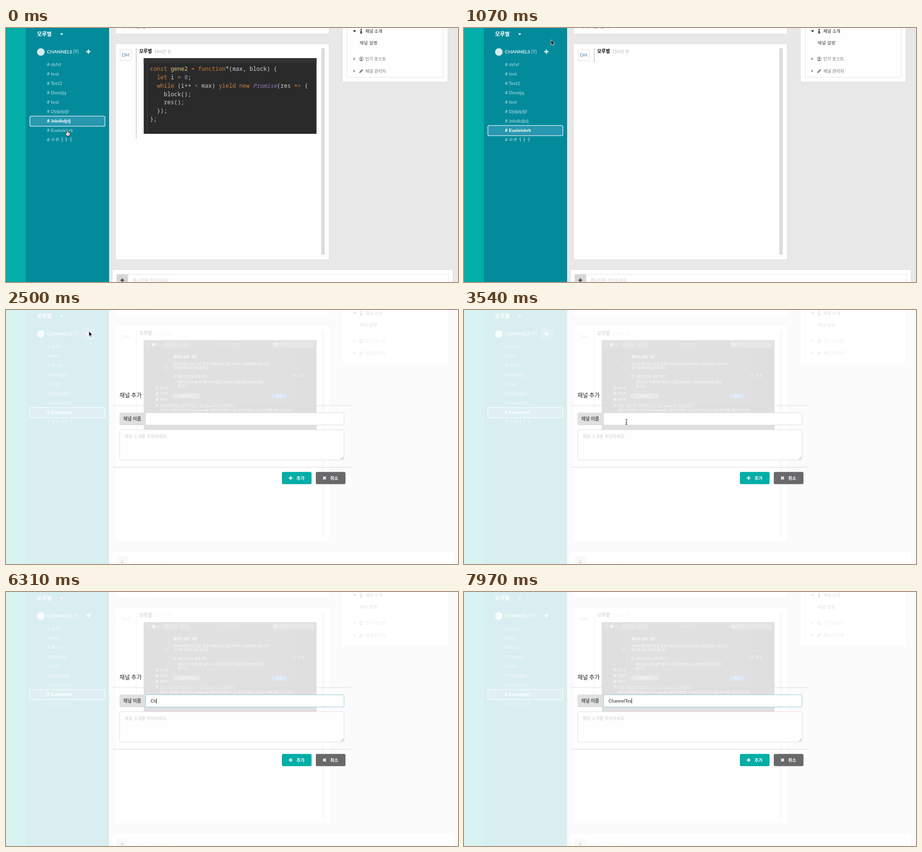
Write an HTML page that moves like this. It is 960 by 540 pixels and loops after 8 s.

```html
<!DOCTYPE html>
<html lang="ko">
<head>
<meta charset="utf-8">
<title>채널 추가</title>
<style>
html, body { margin: 0; width: 100%; height: 100%; overflow: hidden; background: #e9e8e9; }
svg { display: block; width: 960px; height: 540px; }
text { font-family: Lato, "Noto Sans CJK KR", "Noto Sans CJK", sans-serif; white-space: pre; }
.code text { font: 500 12.15px "Noto Sans Mono", "DejaVu Sans Mono", monospace; }
</style>
</head>
<body>
<svg id="stage" viewBox="0 0 960 540"></svg>
<script>
const LOOP = 8000;
const stage = document.getElementById('stage');

const rect = (x, y, w, h, fill, more = '') =>
  `<rect x="${x}" y="${y}" width="${w}" height="${h}" fill="${fill}" ${more}/>`;
const path = (d, fill, more = '') => `<path d="${d}" fill="${fill}" ${more}/>`;
const circle = (x, y, r, fill, more = '') => `<circle cx="${x}" cy="${y}" r="${r}" fill="${fill}" ${more}/>`;
const text = (x, y, size, fill, str, more = '') =>
  `<text x="${x}" y="${y}" font-size="${size}" fill="${fill}" ${more}>${str}</text>`;
const line = (x1, y1, x2, y2, color, more = '') =>
  path(`M${x1} ${y1}L${x2} ${y2}`, 'none', `stroke="${color}" ${more}`);
const plus = (x, y, r, color, turn = 0) =>
  path(`M${x - r} ${y}h${2 * r}M${x} ${y - r}v${2 * r}`, 'none',
    `stroke="${color}" stroke-width="2.6" transform="rotate(${turn} ${x} ${y})"`);
const group = (id, body, more = '') => `<g id="${id}" ${more}>${body}</g>`;

const PAPER = '#fefefe', PAGE = '#e9e8e9', EDGE = '#dededf', TEAL = '#02aea7', SIDE = '#038b9c';
const ITEM = '#8cc9d2', BOLD = 'font-weight="700"', MEDIUM = 'font-weight="500"', MID = 'text-anchor="middle"';
const card = (x, y, w, h) => rect(x, y, w, h, PAPER, `rx="3" stroke="${EDGE}"`);

const USER = '모루별';
const CHANNELS = ['dsfsf', 'test', 'Test2', 'Dmstjq', 'test', 'Djdjdjdjf', 'Jekdkdjdj', 'Eueieiekrk', 'ㅇㄹㅓㅏㅓ'];

function sidebar() {
  return rect(0, 0, 42, 540, TEAL) + rect(42, 0, 177, 540, SIDE) +
    text(66, 17, 11.2, '#fff', USER, BOLD) + path('M115 11.5h6.6l-3.3 4z', '#fff') +
    circle(74, 51, 8, '#d4ebee') +
    text(87, 54, 10.1, '#d9eef1', 'CHANNELS', BOLD) + text(142.7, 54, 10.5, '#b5dbe1', '(9)') +
    group('plusGlow', rect(162, 37.5, 27, 26, '#2b9bae', 'rx="3"')) + plus(175, 50.3, 4.5, '#e4f3f5') +
    group('selected', rect(50.7, 187.3, 159.3, 21.6, '#2897b0', 'rx="3" stroke="#e4f2f5" stroke-width="1.3"')) +
    CHANNELS.map((name, i) =>
      text(87, 80.5 + 20 * i, 10.1, ITEM, '# ' + name, `${BOLD} class="channel"`)).join('');
}

function post() {
  return card(232.5, -20, 454, 32.5) + text(245, -0.5, 11, '#777', '메시지를 입력') +
    card(232.5, 33.5, 454, 459) + rect(669.5, 43, 7.5, 439, '#dcdcdd') +
    rect(242.5, 45.5, 24, 24, PAPER, `rx="2" stroke="${EDGE}"`) +
    text(254, 61, 9.6, '#5b7fa8', 'DM', MID) +
    '<path id="postLine" stroke="#b0b0b2"/>' +
    text(283, 52.5, 9.8, '#111', USER, BOLD) +
    text(315, 52.5, 8.5, '#acacae', '', 'id="age"') +
    group('codeShot', codeShot(), 'class="code"') + group('powerShot', powerShot());
}

function codeShot() {
  const colors = [
    [/^(const|let|while|yield|new|function|=>?|<)$/, '#c67c3a'],
    [/^gene2$/, '#e2c67c'], [/^0$/, '#7d8fae'], [/^Promise$/, '#9078b4']
  ];
  const source = ['const gene2 = function*(max, block) {', '  let i = 0;',
    '  while (i++ < max) yield new Promise(res => {', '    block();', '    res();', '  });', '};'];
  const paint = word => {
    const hit = colors.find(([rule]) => rule.test(word));
    const safe = word.replace('<', '&lt;').replace('>', '&gt;');
    const slant = word === 'Promise' ? 'font-style="italic"' : '';
    return hit ? `<tspan fill="${hit[1]}" ${slant}>${safe}</tspan>` : safe;
  };
  return rect(292.5, 64, 367, 161, '#2a2a2b') + rect(292.5, 64, 367, 11, '#323233') +
    line(300, 76, 300, 225, '#464647') +
    source.map((row, i) =>
      text(306, 91.4 + 17.7 * i, 12.15, '#d0d0d0', row.match(/\w+|=>|\s+|[^\w\s]/g).map(paint).join(''))).join('');
}

function powerShot() {
  const ink = '#ededed', gray = '#68686a', faint = '#858587', bar = '#37373a';
  const label = (x, y, str, size = 6.8, more = MEDIUM) => text(x, y, size, ink, str, more);
  const button = (x, y, w, str, fill = gray, color = ink) =>
    rect(x, y, w, 10.5, fill, 'rx="2"') + text(x + w / 2, y + 7.7, 6.8, color, str, `${MID} ${MEDIUM}`);
  const check = (x, y, on = true) => rect(x, y, 7, 7, gray, 'rx="1.5"') +
    (on ? path(`M${x + 1.5} ${y + 3.5}l1.6 2l2.6 -4`, 'none', `stroke="${ink}"`) : '');
  return rect(292.5, 64, 367, 244.5, '#2a2a2d') + rect(292.5, 64, 367, 18, bar) +
    circle(303, 73.5, 3.3, '#515153') + circle(313.5, 73.5, 3.4, '#f3be3a') + circle(324, 73.5, 3.3, '#515153') +
    rect(335, 68, 30, 11.5, '#5a5a5c', 'rx="2"') + line(350, 68, 350, 79.5, bar) +
    path('M344 71l-2.5 2.7l2.5 2.7M356 71l2.5 2.7l-2.5 2.7', 'none', `stroke="${faint}"`) +
    rect(369, 68, 21, 11.5, '#5a5a5c', 'rx="2"') +
    text(475, 76.3, 7, '#6f6f71', '에너지 절약', MID) +
    rect(566, 68, 88, 11.5, '#616163', 'rx="2"') +
    circle(572, 73, 2.4, 'none', `stroke="${ink}"`) + line(574, 75, 576, 77.2, ink) + text(579, 76, 6.5, faint, '검색') +
    line(303, 103, 648, 103, bar) +
    label(336, 125, '디') + label(605, 140.5, '시간   안 함', 6) + line(610, 124, 627, 124, gray) +
    ['디스플', '가능하', 'Wi-Fi'].map((str, i) => check(317, 162 + 12.3 * i, i > 0) + label(327, 168 + 12.3 * i, str)).join('') +
    rect(344, 84, 263, 114.5, '#2c2c2f', 'stroke="#454547"') +
    label(356, 102, '배터리 상태:  정상', 6.8, BOLD) +
    label(356, 116.5, 'Vok의 배터리는 모든 충전식 배터리와 마찬가지로 소모품이며 시간이 지', 6.9) +
    label(356, 125, '날수록 성능이 감소합니다.', 6.9) +
    check(355, 138, false) + label(366, 144.3, '배터리 성능 상태 관리', 6.7) +
    label(365, 156, '배터리가 오래되면 배터리 수명을 연장하기 위해 최대 용량이 줄어', 6.8) + label(365, 164.3, '듭니다.') +
    button(355, 177.5, 58, '더 알아보기...') + button(564, 177.5, 32, '확인', '#155fc0') +
    check(317, 199) + label(327, 205.5, '전원 어댑터에 연결되어 있는 동안 Quiet Fez 활성화하기', 6.9) +
    label(327, 214.8, '잠자기 상태에서 Vok은 Hour Cabinet을 사용하여 백업할 수 있으며 정기적으로 새로운 이메일, 캘린더 및 기타', 6.2) +
    label(327, 222.8, 'uPlume 업데이트를 확인합니다.', 6.2) +
    label(326, 266.7, '배터리가 충전되었습니다.', 5.8) +
    button(568, 259, 72, '기본값으로 복원', '#4a4a4c', '#7a7a7c') +
    line(303, 278, 648, 278, '#4a4a4c') +
    check(303, 288.5) + label(313, 294.7, '메뉴 막대에서 배터리 상태 보기') +
    button(501, 287, 69, '배터리 성능 상태...') + button(575, 287, 53, '일정...') +
    circle(642, 291, 5.2, gray) + text(642, 293.6, 7, ink, '?', MID);
}

function info() {
  const gray = '#767678';
  const arrow = y => path(`M738 ${y - 3}l4 3l-4 3z`, '#8d8d8f');
  return card(714.5, -20, 224, 135) +
    rect(724.5, -10, 204, 115, 'none', 'stroke="#d8d8da" stroke-dasharray="2 1"') +
    path('M737 5h6.6l-3.3 4z', '#222') + circle(754.3, 3.3, 1.5, '#222') +
    path('M752.3 6h3.2v4h1v1.5h-4.4v-1.5h1v-2.5h-.8z', '#222') +
    text(763, 10, 9.2, '#222', '채널 소개', MEDIUM) +
    text(751, 34.5, 9.6, '#444', '채널 설명') +
    arrow(65.5) + circle(754.5, 65.7, 4.2, 'none', `stroke="${gray}"`) + circle(754.5, 64.5, 1.8, gray) +
    path('M751.5 68.6q3 -3.4 6 0q-3 2.4 -6 0', gray) + text(763, 69.2, 9.1, gray, '인기 포스트') +
    arrow(91.5) + path('M750 96l1 -3l5.5 -5.5l2 2l-5.5 5.5z', gray) + text(763, 95.2, 9.1, gray, '채널 관리자');
}

const composer = () => card(225.5, 513.5, 724, 40) + rect(259, 523.5, 681, 30, PAPER, 'stroke="#e6e6e8"') +
  rect(235, 523.5, 24, 30, '#d6d6d8') + plus(247, 536.3, 4, '#4a4a4c') +
  text(269, 540, 9, '#d2d2d4', '메시지를 작성하세요.');

function modal() {
  const rule = y => line(227, y, 733, y, '#dedee0', 'stroke-width="1.2"');
  return text(241, 186, 12, '#222', '채널 추가', MEDIUM) + rule(203) + rule(334.3) +
    rect(241, 218, 56, 27, '#e0e0e1', 'rx="3"') + text(249, 234.6, 9.7, '#59595a', '채널 이름', BOLD) +
    rect(296.5, 218.5, 421.5, 26, PAPER, 'id="field" rx="2"') +
    text(307, 234.8, 9.7, '#222', '', 'id="typed"') + rect(0, 226, 1, 11, '#222', 'id="caret"') +
    rect(241.5, 254.5, 476.5, 64.5, PAPER, 'rx="3" stroke="#dedee0"') +
    text(252, 272, 9.1, '#cfcfd1', '채널 소개를 작성하세요.') +
    path('M711 317.5l5.5 -5.5M714 317.5l2.5 -2.5', 'none', 'stroke="#97979a"') +
    rect(586, 344.3, 63, 26, TEAL, 'rx="3"') + plus(604.5, 357.2, 4, '#e6f8f7') +
    text(617, 360.6, 9.3, '#fff', '추가', BOLD) +
    rect(658, 344.3, 63, 26, '#69696b', 'rx="3"') + plus(676.5, 357.2, 4, '#f0f0f0', 45) +
    text(688.5, 360.6, 9.3, '#fff', '취소', BOLD);
}

const cursors = () =>
  group('arrow', path('M0 0V11L2.5 8.7L4.3 12.4L6 11.5L4.3 8H7.6Z', '#111', 'stroke="#f4f4f4" stroke-width=".8"')) +
  group('hand', path('M-1.4 1Q0 -.8 1.2 1V4.6L5 5.4Q6.6 6 6.2 8L5 12.4H-1L-4.4 7.4Q-4 5.8 -1.4 7.8Z', '#fff',
    'stroke="#111" stroke-linejoin="round"') + path('M1.4 7.5v2.6M3.4 7.5v2.6', 'none', 'stroke="#111" stroke-width=".7"')) +
  group('beam', path('M-2.5 -5.5Q0 -5.5 0 -4V4Q0 5.5 -2.5 5.5M2.5 -5.5Q0 -5.5 0 -4M2.5 5.5Q0 5.5 0 4M-1.5 1.5h3', 'none',
    'stroke="#333"'));

stage.innerHTML = rect(0, 0, 960, 540, PAGE) + sidebar() + post() + info() + composer() +
  rect(0, 0, 960, 540, '#fff', 'id="veil"') + group('modal', modal()) + group('cursor', cursors());

const el = Object.fromEntries([...stage.querySelectorAll('[id]')].map(node => [node.id, node]));
const rows = [...stage.querySelectorAll('.channel')];
const show = (node, on) => node.setAttribute('visibility', on ? 'inherit' : 'hidden');

const SWITCH = 200, LOADED = 1300, HOVER = 1620, OPEN = 2150, FOCUS = 3750, TYPING = 4100;
// time, x, y of the pointer tip
const MOVES = [[0, 130, 217], [380, 130, 217], [1000, 185, 25], [1180, 185, 25], [1680, 176, 45],
  [2600, 176, 45], [3350, 345, 238], [LOOP, 345, 238]];
const EDITS = [[FOCUS, ''], [4150, 'd'], [4280, 'dd'], [4400, 'ddd'], [5350, 'dd'], [5480, 'd'], [5600, '']];
[...'ChannelTes'].forEach((_, i) => EDITS.push([6010 + 208 * i, 'ChannelTes'.slice(0, i + 1)]));

const clamp = v => Math.min(1, Math.max(0, v));
const ease = v => v * v * (3 - 2 * v);

function pointerAt(t) {
  const i = Math.max(1, MOVES.findIndex(move => move[0] > t));
  const [t0, x0, y0] = MOVES[i - 1], [t1, x1, y1] = MOVES[i];
  const k = ease(clamp((t - t0) / (t1 - t0)));
  return [x0 + (x1 - x0) * k, y0 + (y1 - y0) * k];
}

function pointerShape(t, x, y) {
  if (t > OPEN + 150) return x > 296 && y > 218 && y < 245 ? 'beam' : 'arrow';
  const onRow = y > 67 && y < 247;
  const onPlus = x > 162 && x < 189 && y > 37 && y < 64;
  return onRow || onPlus ? 'hand' : 'arrow';
}

function draw(t) {
  const current = t < SWITCH ? 6 : 7;
  el.selected.setAttribute('transform', `translate(0 ${20 * (current - 6)})`);
  rows.forEach((row, i) => row.setAttribute('fill', i === current ? '#fff' : ITEM));

  const loaded = t >= LOADED;
  show(el.codeShot, t < SWITCH);
  show(el.powerShot, loaded);
  el.age.textContent = t < SWITCH ? '16시간 전' : '15시간 전';
  el.postLine.setAttribute('d', `M276.5 43V${t < SWITCH ? 235 : loaded ? 318 : 73}`);

  const glow = clamp((t - HOVER) / 100) * (1 - clamp((t - FOCUS) / 100));
  el.plusGlow.setAttribute('opacity', glow);
  const open = ease(clamp((t - OPEN) / 300));
  el.veil.setAttribute('opacity', 0.85 * open);
  el.modal.setAttribute('opacity', open);

  const [editTime, value] = EDITS.filter(edit => edit[0] <= t).pop() || [0, ''];
  el.field.setAttribute('stroke', t < FOCUS ? '#dedee0' : '#96c8da');
  el.typed.textContent = value;
  el.caret.setAttribute('x', 307 + (value ? el.typed.getComputedTextLength() : 0));
  show(el.caret, t >= FOCUS && (t - editTime) % 1000 < 500);

  const [x, y] = pointerAt(t);
  const shape = pointerShape(t, x, y);
  el.cursor.setAttribute('transform', `translate(${x} ${y})`);
  for (const name of ['arrow', 'hand', 'beam']) show(el[name], name === shape && t < TYPING);
}

const start = performance.now();
function tick() {
  draw((performance.now() - start) % LOOP);
  requestAnimationFrame(tick);
}
tick();
</script>
</body>
</html>
```
